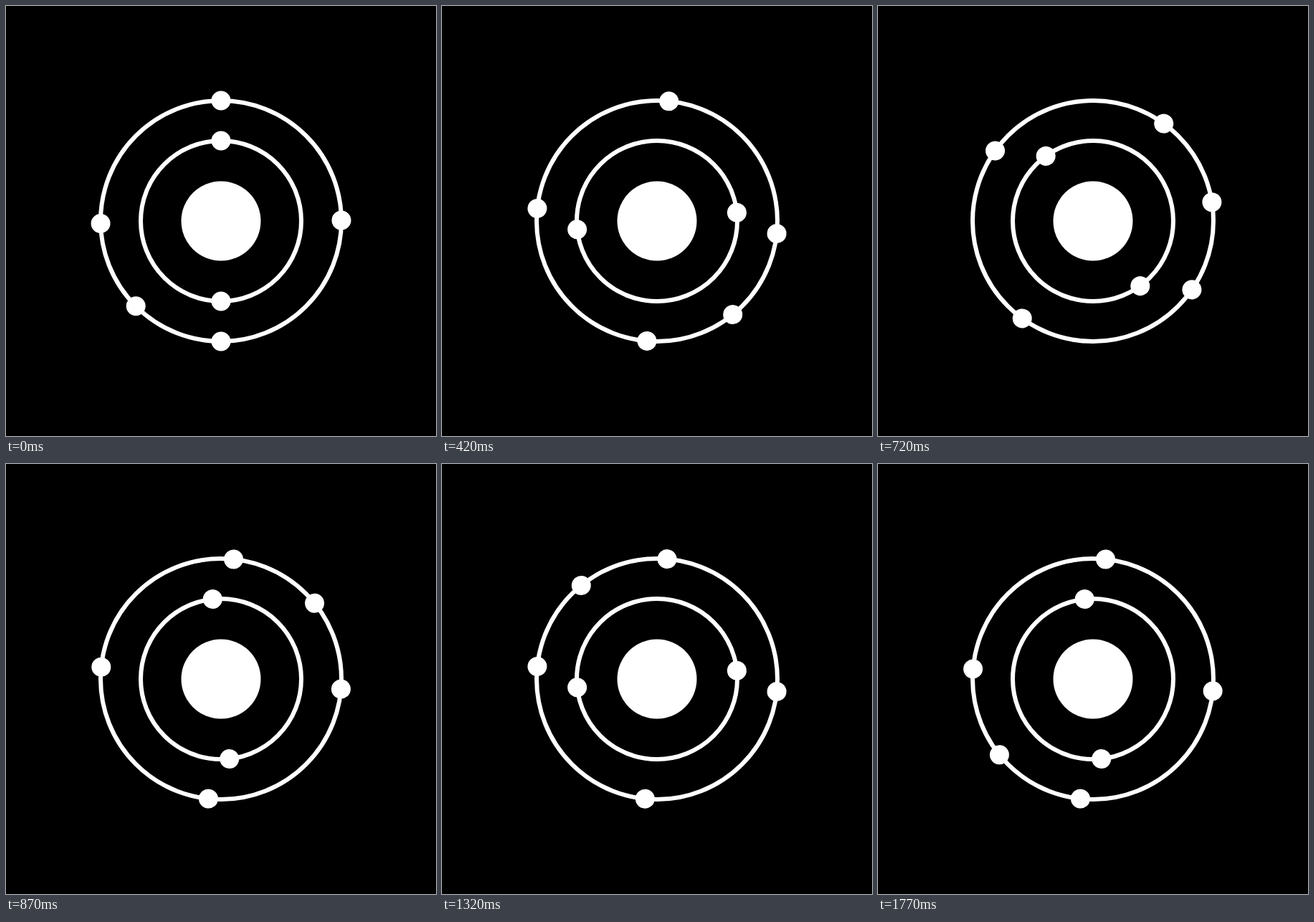
Write an HTML page that moves like this. It is 600 px wide and 600 px high and loops after 1.8 s.

```html
<!DOCTYPE html>
<html lang="en">
<head>
<meta charset="utf-8">
<title>Atom</title>
<style>
  html, body { margin: 0; height: 100%; overflow: hidden; background: #000; }
  svg { display: block; width: 100%; height: 100%; }
</style>
</head>
<body>
<svg viewBox="-300 -300 600 600" fill="#fff">
  <circle r="55.5"/>
</svg>
<script>
const LOOP = 1800, STEP = 30, DOT = 13.5;
const svg = document.querySelector('svg');

function add(parent, tag, attrs) {
  const el = document.createElementNS('http://www.w3.org/2000/svg', tag);
  for (const key in attrs) el.setAttribute(key, attrs[key]);
  return parent.appendChild(el);
}

// Angles run clockwise from the top; dir is the sense of rotation.
function shell(radius, dir, angles) {
  add(svg, 'circle', { r: radius, fill: 'none', stroke: '#fff', 'stroke-width': 6 });
  const group = add(svg, 'g', {});
  for (const a of angles) add(group, 'circle', { cy: -radius, r: DOT, transform: `rotate(${a})` });
  return { group, dir };
}

const shells = [
  shell(112, 1, [0, 180]),
  shell(168, -1, [0, 89.7, 180, 225, 268.8])
];

const start = performance.now();

function draw(now) {
  const t = Math.max(0, now - start) % LOOP;
  const turn = Math.floor(t / STEP) * STEP / LOOP * 360;
  for (const s of shells) s.group.setAttribute('transform', `rotate(${s.dir * turn})`);
  requestAnimationFrame(draw);
}
draw(start);
</script>
</body>
</html>
```
